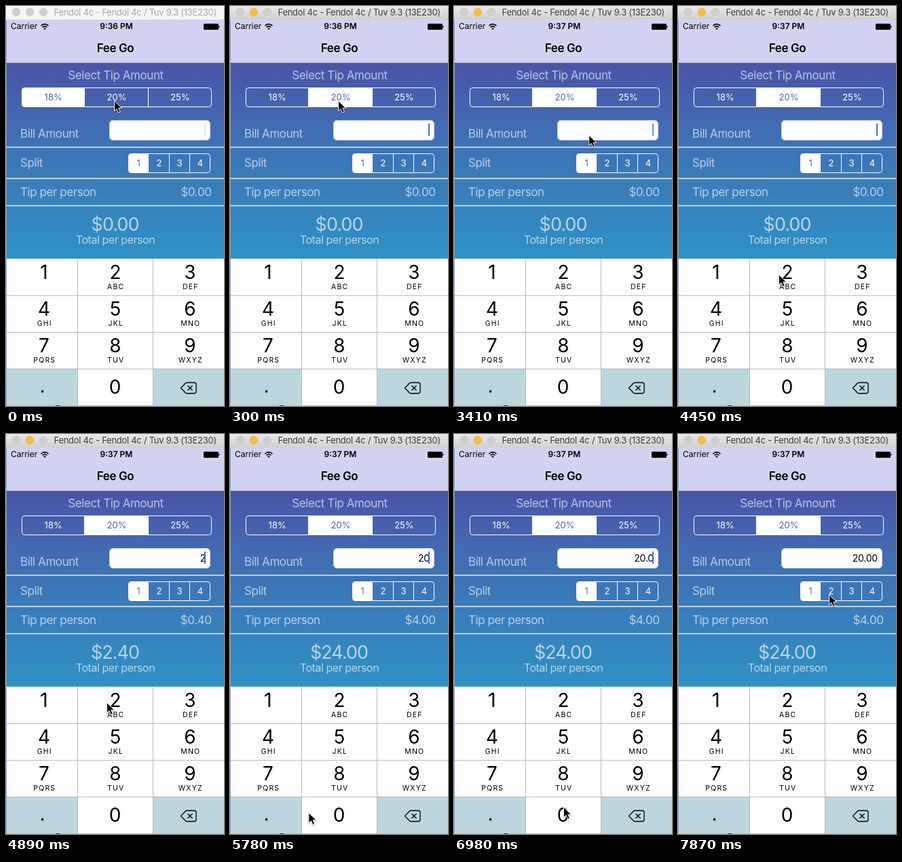
Recreate the animation shown at these times as an HTML page. Size 321x589 px, loop 8 s.

```html
<!DOCTYPE html>
<html lang="en">
<head>
<meta charset="utf-8">
<title>Tip calculator</title>
<style>
  html, body { margin: 0; width: 100%; height: 100%; overflow: hidden; }
  svg { display: block; width: 321px; height: 589px; font-family: Inter, Roboto, sans-serif; }
  .label { fill: #fff; fill-opacity: .64; font-size: 17px; letter-spacing: -.43px; }
  .seg { font-size: 13px; text-anchor: middle; }
  .digit { font-size: 28px; text-anchor: middle; }
  .letters { font-size: 10.5px; letter-spacing: 1.2px; text-anchor: middle; }
  .mid { text-anchor: middle; }
  .end { text-anchor: end; }
</style>
</head>
<body>
<svg id="stage" viewBox="0 0 321 589">
  <defs>
    <linearGradient id="bar" x2="0" y2="1">
      <stop stop-color="#e9e7e9"/><stop offset="1" stop-color="#d2d0d2"/>
    </linearGradient>
    <linearGradient id="sky" x2="0" y2="1">
      <stop stop-color="#4a54a7"/><stop offset=".45" stop-color="#3e74b6"/><stop offset="1" stop-color="#2e92c4"/>
    </linearGradient>
  </defs>
</svg>
<script>
const LOOP = 8000, TICK = 148.4, LEAD = 8;
const KEY_WHITE = '#fefefe', KEY_TINT = '#bdd6de';
const stage = document.getElementById('stage');

function add(tag, attrs, text, parent = stage) {
  const node = document.createElementNS('http://www.w3.org/2000/svg', tag);
  for (const name in attrs) node.setAttribute(name, attrs[name]);
  if (text !== undefined) node.textContent = text;
  parent.appendChild(node);
  return node;
}
const rect = (x, y, width, height, fill, more) => add('rect', { x, y, width, height, fill, ...more });
const label = (x, y, text, cls = '', more) => add('text', { x, y, class: cls, ...more }, text);
const set = (node, name, value) => node.setAttribute(name, value);
const clamp = value => Math.max(0, Math.min(1, value));

// Window title bar
const titleBar = rect(0, 0, 321, 20);
const lights = [15, 35, 55].map(cx => add('circle', { cx, cy: 9, r: 5.8, 'stroke-width': .6 }));
const windowTitle = label(70.5, 14, 'Fendol 4c - Fendol 4c / Tuv 9.3 (13E230)', '',
  { 'font-size': 13, 'letter-spacing': '-.28px' });

// Status and navigation bar
rect(0, 20, 321, 64, '#d2d2f2');
rect(0, 83, 321, 1, '#aeb0d4');
label(7, 34, 'Carrier', '', { 'font-size': 12 });
const wifi = { fill: 'none', stroke: '#000', 'stroke-width': 1.6 };
add('path', { d: 'M51.5 29.2Q57 24 62.5 29.2M53.6 31.5Q57 28.3 60.4 31.5', ...wifi });
add('path', { d: 'M55.2 33Q57 31.3 58.8 33L57 35Z' });
const clock = label(162.5, 34, '', 'mid', { 'font-size': 12, 'font-weight': 600 });
rect(291, 26, 22, 9, '#000', { rx: 1.6 });
add('path', { d: 'M313.6 28.5q2.4 2 0 4z' });
label(161, 68, 'Fee Go', 'mid', { 'font-size': 17, 'font-weight': 600, 'letter-spacing': '-.43px' });

// Calculator
rect(0, 84, 321, 289, 'url(#sky)');
for (const y of [207, 253, 293]) rect(0, y, 321, 2, '#fff', { 'fill-opacity': .66 });
label(161.5, 108, 'Select Tip Amount', 'label mid');
label(21, 193.5, 'Bill Amount', 'label');
label(21, 236.5, 'Split', 'label');
label(21, 279.5, 'Tip per person', 'label');
label(161, 349.5, 'Total per person', 'label mid', { style: 'font-size:16px;letter-spacing:-.45px' });
const tipText = label(302.5, 279.5, '', 'label end');
const totalText = label(160.5, 331, '', 'label mid', { style: 'font-size:27px;letter-spacing:-1px' });

function segments(left, y, width, height, names, ink) {
  const edge = i => left + Math.floor(width * i / names.length - .5 * (i > 0));
  const clipId = 'clip' + y;
  const frame = { x: left + .5, y: y + .5, width: width - 1, height: height - 1, rx: 4 };
  add('rect', frame, undefined, add('clipPath', { id: clipId }));
  const fill = rect(0, y, 0, height, '#fff', { 'clip-path': `url(#${clipId})` });
  add('rect', { ...frame, fill: 'none', stroke: '#fff' });
  const texts = names.map((name, i) => {
    if (i) rect(edge(i), y, 1, height, '#fff');
    return label(left + width * (i + .5) / names.length, y + height / 2 + 4.7, name, 'seg');
  });
  return chosen => {
    set(fill, 'x', edge(chosen));
    set(fill, 'width', edge(chosen + 1) - edge(chosen) + 1);
    texts.forEach((text, i) => set(text, 'fill', i === chosen ? ink : '#fff'));
  };
}
const chooseTip = segments(23, 120, 280, 29, ['18%', '20%', '25%'], '#4463b0');
segments(180, 217, 121, 29, ['1', '2', '3', '4'], '#3e77b8')(0);

rect(152.5, 168.5, 148, 29, '#fefefe', { rx: 5, stroke: '#c3cfe4' });
const billText = label(294, 187.5, '', 'end', { 'font-size': 14, 'letter-spacing': '-.2px' });
const caret = rect(292, 173, 2, 18, '#426bf2');

// Keypad
const columns = [0, 106, 217, 321], centers = [56, 161, 271];
const letters = ['', 'ABC', 'DEF', 'GHI', 'JKL', 'MNO', 'PQRS', 'TUV', 'WXYZ'];
const keys = {};
[...'123456789.0<'].forEach((name, i) => {
  const col = i % 3, row = Math.floor(i / 3), top = 372 + row * 54;
  const rest = '.<'.includes(name) ? KEY_TINT : KEY_WHITE;
  const back = rect(columns[col], top, columns[col + 1] - columns[col], 55, rest);
  keys[name] = { back, rest, pressed: rest === KEY_TINT ? KEY_WHITE : KEY_TINT };
  if (row < 3) {
    label(centers[col], top + 30, name, 'digit');
    label(centers[col] + .8, top + 45, letters[i], 'letters');
  }
});
label(160.5, 571, '0', 'digit');
rect(52, 565.8, 3.2, 3.4, '#000', { rx: .6 });
add('path', {
  d: 'M257.5 562.5L264.5 555.2Q265.2 554.5 266.2 554.5H277Q280 554.5 280 557.5V567.5Q280 570.5 277 570.5H266.2Q265.2 570.5 264.5 569.8ZM267.5 559L274.5 566M274.5 559L267.5 566',
  fill: 'none', stroke: '#000', 'stroke-width': 1.3, 'stroke-linejoin': 'round'
});
for (const y of [426, 480, 534]) rect(0, y, 321, 1, '#a9adb0', { opacity: .8 });
for (const x of [105, 216]) rect(x, 372, 1, 217, '#a9adb0', { opacity: .8 });

// Window edges
rect(0, 20, 1, 569, '#8fa3bd');
rect(0, 588, 321, 1, '#b9bdc0');
rect(73, 588, 6, 1, '#333');

const pointer = add('path', {
  d: 'M.5.5V15.6L4 12.4 6.6 18.2 9.3 17 6.8 11.3H11.6Z',
  fill: '#000', stroke: '#fff', 'stroke-width': 1, 'stroke-linejoin': 'round',
  style: 'filter:drop-shadow(0 1px 1px rgba(0,0,0,.35))'
});

// Script of the demo, in ms
const FOCUS = 140, PICK = 290, MINUTE = 880, HOLD = 110;
const taps = [[4560, '2'], [5360, '0'], [6200, '.'], [6800, '0'], [7100, '0']]
  .map(([down, key]) => ({ down, up: down + HOLD, key }));
const home = { x: 159, y: 139 };
const moves = [
  { from: 450, to: 1190, x: 201, y: 178.5 },
  { from: 3270, to: 4300, x: 148, y: 395 },
  { from: 4890, to: 5350, x: 158, y: 558 },
  { from: 5640, to: 5980, x: 52, y: 556 },
  { from: 6390, to: 6830, x: 161, y: 549 },
  { from: 7280, to: 7860, x: 222, y: 236 }
];
const caretResets = [-490, 250, 1520, ...taps.map(tap => tap.up)];

const ease = u => u * u * (3 - 2 * u);

function pointerAt(time) {
  return moves.reduce((at, { from, to, x, y }) => {
    const u = ease(clamp((time - from) / (to - from)));
    return { x: at.x + (x - at.x) * u, y: at.y + (y - at.y) * u };
  }, home);
}

// The caret pulses once a second, starting anew with every edit
function caretOpacity(time) {
  const reset = caretResets.filter(r => r <= time).pop();
  return clamp(.85 + 1.3 * Math.cos((time - reset - 150) / 1000 * 2 * Math.PI));
}

function render(time) {
  const active = time >= FOCUS;
  set(titleBar, 'fill', active ? 'url(#bar)' : '#f6f6f6');
  set(windowTitle, 'fill', active ? '#404040' : '#a9a9a9');
  lights.forEach((light, i) => {
    const lit = active && i === 1;
    set(light, 'fill', lit ? '#fdbc40' : '#d0ced0');
    set(light, 'stroke', lit ? '#e8aa38' : '#c3c1c3');
  });
  clock.textContent = time >= MINUTE ? '9:37 PM' : '9:36 PM';

  const bill = taps.filter(tap => tap.up <= time).map(tap => tap.key).join('');
  const tip = Number(bill) * .2;
  chooseTip(time >= PICK ? 1 : 0);
  billText.textContent = bill;
  tipText.textContent = '$' + tip.toFixed(2);
  totalText.textContent = '$' + (Number(bill) + tip).toFixed(2);
  set(caret, 'opacity', caretOpacity(time));

  const held = taps.find(tap => tap.down <= time && time < tap.up);
  for (const name in keys) {
    const key = keys[name];
    set(key.back, 'fill', held && held.key === name ? key.pressed : key.rest);
  }
  const { x, y } = pointerAt(time);
  set(pointer, 'transform', `translate(${x} ${y})`);
}

// The picture is held between ticks, like a screen recording
const start = performance.now();
function loop() {
  const time = (performance.now() - start) % LOOP;
  render(Math.floor((time + LEAD) / TICK) * TICK);
  requestAnimationFrame(loop);
}
loop();
</script>
</body>
</html>
```
